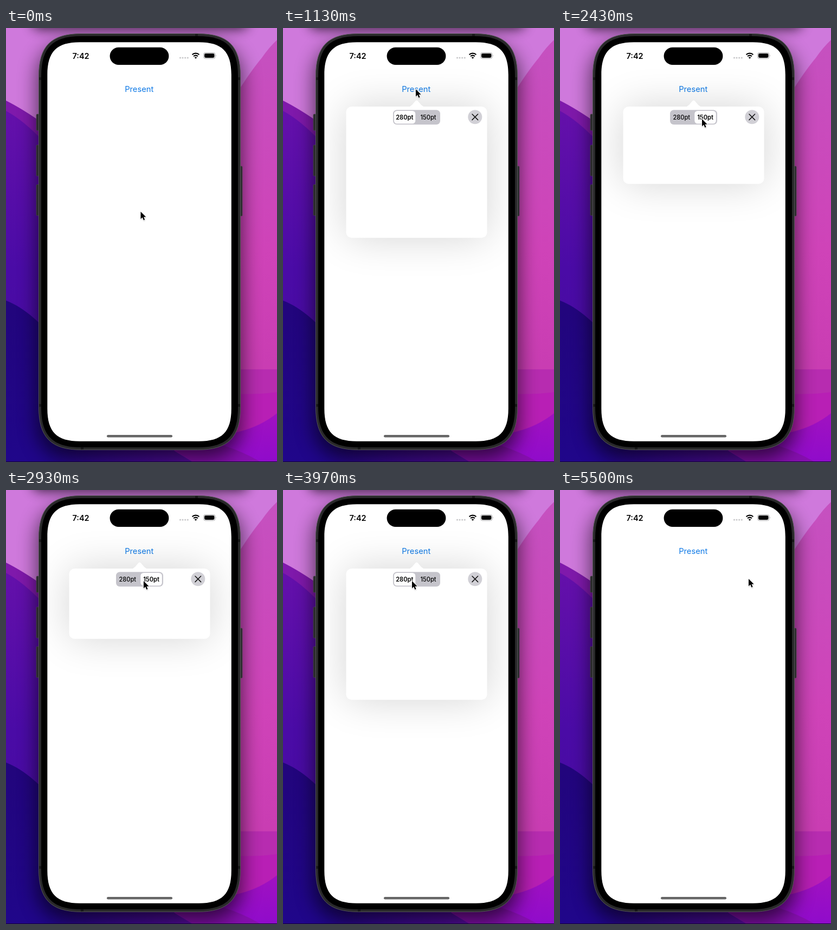
An HTML page that plays this animation: 500 by 801 pixels, repeating every 5.53 s.

```html
<!DOCTYPE html>
<html lang="en">
<head>
<meta charset="utf-8">
<title>Resizable popover</title>
<style>
  html, body { margin: 0; width: 100%; height: 100%; overflow: hidden; }
  svg { display: block; width: 100%; height: 100%; }
  text { font-family: Inter, Roboto, sans-serif; text-anchor: middle; }
  .segment { font-size: 11.1px; font-weight: 500; }
  .segment.selected { font-weight: 600; }
</style>
</head>
<body>
<svg viewBox="0 0 500 801">
  <defs>
    <linearGradient id="violet" x2="0" y2="1">
      <stop stop-color="#6410aa"/><stop offset=".45" stop-color="#4a0ba6"/><stop offset="1" stop-color="#470d9f"/>
    </linearGradient>
    <linearGradient id="navy" x2="0" y2="1">
      <stop stop-color="#22057c"/><stop offset="1" stop-color="#20068a"/>
    </linearGradient>
    <linearGradient id="pink" x2="0" y2="1">
      <stop stop-color="#c551c0"/><stop offset=".5" stop-color="#cf43b8"/><stop offset="1" stop-color="#c438ae"/>
    </linearGradient>
    <linearGradient id="floor">
      <stop stop-color="#20068a"/><stop offset=".6" stop-color="#4d0b9b"/><stop offset="1" stop-color="#7510b4"/>
    </linearGradient>
    <linearGradient id="orchid" x2="0" y2="1">
      <stop stop-color="#a012c0"/><stop offset="1" stop-color="#900bcb"/>
    </linearGradient>
    <filter id="phoneBlur" filterUnits="userSpaceOnUse" x="-60" y="-60" width="620" height="940">
      <feGaussianBlur stdDeviation="18"/>
    </filter>
    <filter id="barBlur" filterUnits="userSpaceOnUse" x="-60" y="-120" width="620" height="200">
      <feGaussianBlur stdDeviation="11"/>
    </filter>
    <filter id="cardBlur" filterUnits="userSpaceOnUse" x="-40" y="0" width="580" height="560" color-interpolation-filters="sRGB">
      <feGaussianBlur stdDeviation="38"/>
    </filter>
    <filter id="cursorBlur" x="-50%" y="-50%" width="200%" height="200%">
      <feGaussianBlur stdDeviation="1"/>
    </filter>
    <clipPath id="screen"><path id="screenShape"/></clipPath>
  </defs>

  <!-- wallpaper -->
  <rect width="500" height="801" fill="#cf79dc"/>
  <path d="M0 134Q30 149 70 177L160 801H0Z" fill="#7f19ab"/>
  <path d="M0 153Q32 170 70 210L160 801H0Z" fill="url(#violet)"/>
  <path d="M0 503Q34 516 70 553L160 801H0Z" fill="url(#navy)"/>
  <path d="M80 740H440V801H80Z" fill="url(#floor)"/>
  <path d="M500 22Q485 36 472 55Q448 84 420 130V801H500Z" fill="url(#pink)"/>
  <path d="M420 630H500V801H420Z" fill="#b72cb0"/>
  <path d="M420 675Q465 677 500 672V801H420Z" fill="#b81fb5"/>
  <path d="M310 780Q390 755 430 745T500 711V801H345Z" fill="url(#orchid)"/>
  <path d="M310 779L345 801H470Q440 783 400 770Z" fill="#850fae"/>
  <rect x="50" y="-100" width="395" height="102" rx="8" opacity=".72" filter="url(#barBlur)"/>
  <rect x="58" y="28" width="377" height="768" rx="62" opacity=".62" filter="url(#phoneBlur)"/>
  <rect y="800" width="500" height="1" fill="#160338"/>

  <!-- phone -->
  <g fill="#2b2b2d" stroke="#454547" stroke-width=".7">
    <rect x="56" y="159" width="7" height="30" rx="1.5"/>
    <rect x="56" y="216" width="7" height="57" rx="1.5"/>
    <rect x="56" y="289" width="7" height="57" rx="1.5"/>
    <rect x="430" y="255" width="6" height="92" rx="1.5"/>
  </g>
  <path id="frameShape" fill="#29292a" stroke="#555557"/>
  <path d="M61 91h4v5h-4zM61 694h4v5h-4zM428 91h4v5h-4zM428 694h4v5h-4zM349 11h5v4h-5zM138 774h5v4h-5z" fill="#171718"/>
  <path id="bezelShape"/>

  <!-- screen -->
  <g clip-path="url(#screen)">
    <rect x="70" y="20" width="352" height="750" fill="#fff"/>
    <text x="138" y="56.5" font-size="14.5" font-weight="600">7:42</text>
    <rect x="191.600" y="35.700" width="108.800" height="32.200" rx="16.100"/>
    <g fill="#c8c8ca">
      <circle cx="321.5" cy="55" r="1.6"/><circle cx="326" cy="55" r="1.6"/>
      <circle cx="330.7" cy="55" r="1.6"/><circle cx="335.3" cy="55" r="1.6"/>
    </g>
    <path d="M343.6 49.3a9 9 0 0 1 12.8 0M346.1 52.2a5.5 5.5 0 0 1 7.8 0" fill="none" stroke="#000" stroke-width="2.1"/>
    <path d="M350 56.8l-2.3-2.3a3.3 3.3 0 0 1 4.6 0z"/>
    <rect x="364.5" y="45.5" width="21.5" height="11" rx="3.6" fill="none" stroke="#a5a5a7"/>
    <rect x="366" y="47" width="18.5" height="8" rx="2.4"/>
    <path d="M387 49.3q1.6 1.7 0 3.4z" fill="#a5a5a7"/>
    <text x="245.7" y="118" font-size="14.7" fill="#107ae6">Present</text>

    <g id="popover">
      <rect class="card" x="116.5" y="145" width="260" rx="10" opacity=".17" filter="url(#cardBlur)"/>
      <path d="M230 146Q235 145 238 142L244 135Q246.5 132 249 135L255 142Q258 145 263 146Z" fill="#fff"/>
      <rect class="card" x="116.5" y="145" width="260" rx="10" fill="#fff"/>
      <rect x="203" y="151.3" width="87" height="27" rx="7" fill="#c5c4cb"/>
      <rect id="thumb" y="153" width="39.5" height="23.6" rx="5.5" fill="#fff"/>
      <text class="segment" x="224.3" y="168.6">280pt</text>
      <text class="segment" x="268" y="168.6">150pt</text>
      <circle cx="354.3" cy="164.3" r="13" fill="#d1d0d6"/>
      <path d="M349 159l10.600 10.600m0-10.600L349 169.600" stroke="#111" stroke-width="1.5" stroke-linecap="round"/>
    </g>
    <rect x="186" y="751" width="121" height="4.5" rx="2.2" fill="#666"/>
  </g>

  <g id="cursor">
    <path d="M0 1V15L3.3 12L5.7 17.300L8 16.300L5.800 11.200H10Z" opacity=".35" filter="url(#cursorBlur)"/>
    <path d="M0 0V13.500L3.200 10.600L5.400 15.700L7.600 14.700L5.500 9.800H9.700Z" stroke="#fff" stroke-width="1.800" stroke-linejoin="round" paint-order="stroke"/>
  </g>
</svg>

<script>
const LOOP = 5530;
const byId = id => document.getElementById(id);
const popover = byId('popover'), thumb = byId('thumb'), cursor = byId('cursor');
const cards = document.querySelectorAll('.card');
const [tallLabel, shortLabel] = document.querySelectorAll('.segment');

// Rectangle with smooth corners that start to bend earlier than a circular arc of radius r.
function smoothRect(x, y, w, h, r) {
  const d = 1.25 * r, c = 0.36 * r, b = d - c;
  return `M${x + d} ${y}h${w - 2 * d}c${b} 0 ${d} ${c} ${d} ${d}` +
    `v${h - 2 * d}c0 ${b} ${-c} ${d} ${-d} ${d}` +
    `h${2 * d - w}c${-b} 0 ${-d} ${-c} ${-d} ${-d}` +
    `v${2 * d - h}c0 ${-b} ${c} ${-d} ${d} ${-d}z`;
}
byId('frameShape').setAttribute('d', smoothRect(60.5, 10.5, 372, 768, 63));
byId('bezelShape').setAttribute('d', smoothRect(65, 15, 363, 759, 59));
byId('screenShape').setAttribute('d', smoothRect(76.3, 26.2, 339.5, 736.6, 48));

const mix = (a, b, u) => a + (b - a) * u;
const progress = (t, start, end) => Math.min(1, Math.max(0, (t - start) / (end - start)));
const easeInOut = u => u * u * (3 - 2 * u);
const easeOut = u => 1 - (1 - u) ** 3;

// Each move: start time, end time, destination of the pointer tip.
const moves = [
  [30, 570, 245, 113],
  [1370, 1900, 262, 168],
  [2740, 3230, 238, 168],
  [4200, 4730, 349, 166],
  [4770, 4900, 348, 164],
];

function pointerAt(t) {
  let x = 248.5, y = 339;
  for (const [start, end, toX, toY] of moves) {
    const u = easeInOut(progress(t, start, end));
    x = mix(x, toX, u);
    y = mix(y, toY, u);
  }
  return [x, y];
}

function draw(t) {
  const shown = easeInOut(progress(t, 600, 970)) * (1 - easeOut(progress(t, 5070, LOOP)));
  const compact = easeOut(progress(t, 2200, 2650)) - easeOut(progress(t, 3400, 3850));
  const slide = easeInOut(progress(t, 2190, 2420)) - easeInOut(progress(t, 3390, 3620));

  popover.setAttribute('opacity', shown);
  cards.forEach(card => card.setAttribute('height', mix(242.3, 129.8, compact)));
  thumb.setAttribute('x', mix(204.8, 248.3, slide));
  tallLabel.classList.toggle('selected', slide < 0.5);
  shortLabel.classList.toggle('selected', slide >= 0.5);
  cursor.setAttribute('transform', `translate(${pointerAt(t)})`);
}

const startTime = performance.now();
function frame() {
  draw((performance.now() - startTime) % LOOP);
  requestAnimationFrame(frame);
}
frame();
</script>
</body>
</html>
```
